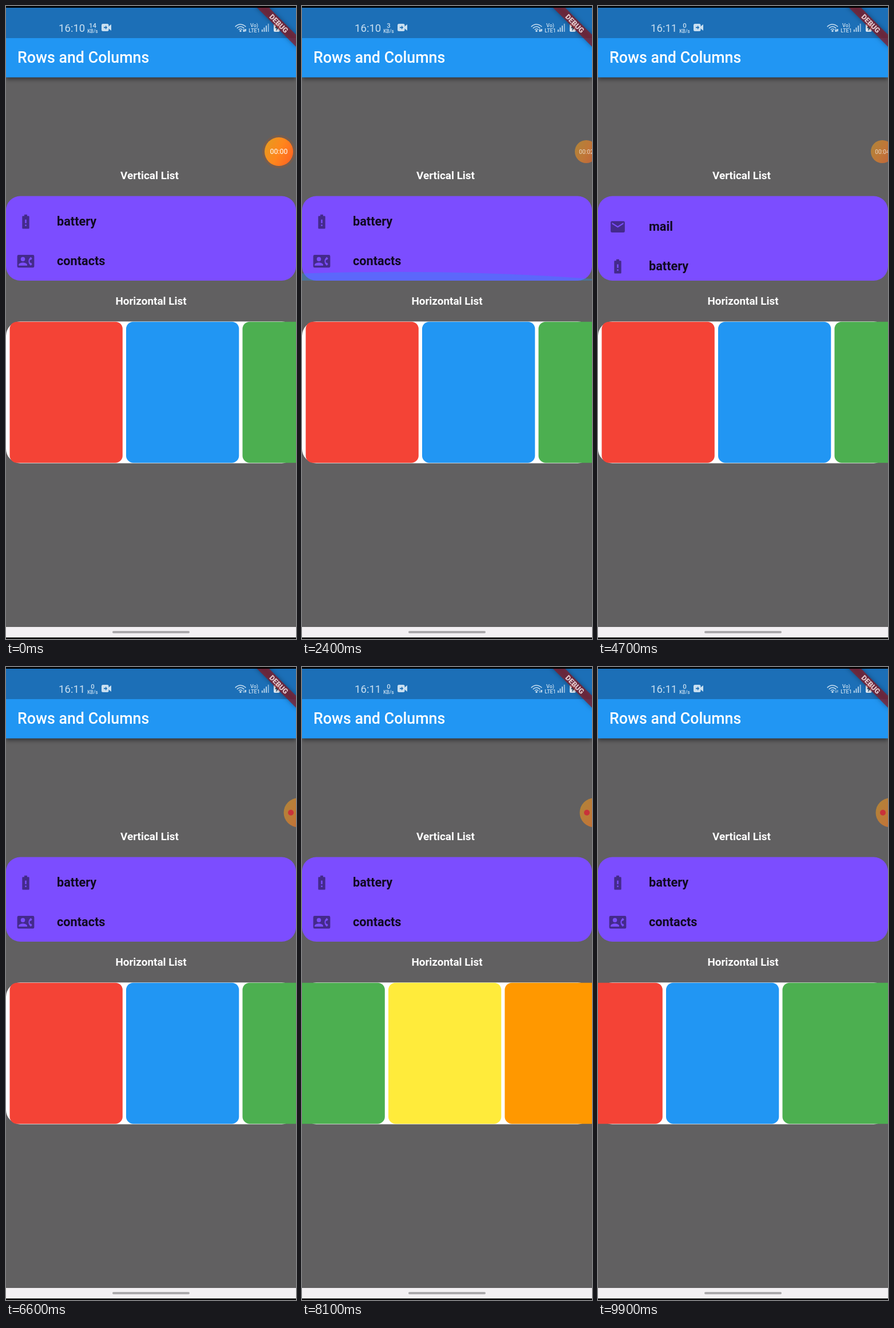
Animation of 507x1104 px, one loop 10 s. Source, as an HTML page with a canvas:

```html
<!DOCTYPE html>
<html lang="en">
<head>
<meta charset="utf-8">
<title>Rows and Columns</title>
<style>
  html, body { margin: 0; width: 100%; height: 100%; overflow: hidden; background: #000; }
  canvas { display: block; }
</style>
</head>
<body>
<canvas id="stage" width="507" height="1104"></canvas>
<script>
const ctx = document.getElementById('stage').getContext('2d');
const W = 507, H = 1104, LOOP = 10000, STEP = 100;
const LIST = { top: 331.5, bottom: 479, pitch: 69 };
const CARDS = { top: 550.7, height: 246, width: 197.3, pitch: 203.5, left: 6.5 };
const CARD_COLORS = ['#f44336', '#2196f3', '#4caf50', '#ffeb3b', '#ff9800'];

// Keyframes: [ms, value]
const listScroll = track([[600, 0], [1100, 60], [1500, 78], [1700, 76], [2050, 0],
  [2900, 0], [3400, 50], [3900, 76], [4700, 78], [5200, 76], [5900, 0]]);
const cardScroll = track([[6650, 0], [6950, 230], [7300, 348], [7400, 348], [8100, 466],
  [8600, 517], [8850, 517], [9100, 457], [9600, 152], [9900, 91]]);
const bottomGlow = track([[2000, 0], [2200, 0.24], [2400, 0.15], [2700, 0],
  [5900, 0], [6150, 0.29], [6500, 0]]);
const rightGlow = track([[8500, 0], [8800, 0.6], [9100, 0.32], [9300, 0]]);
const bubbleX = track([[700, 477], [1100, 497], [5400, 497], [5700, 511]]);
const bubbleR = track([[700, 25], [1100, 20], [5400, 20], [5700, 25.5]]);
const bubbleFade = track([[700, 0], [1100, 1]]);

// Monotone cubic interpolation, held flat outside the keys.
function track(keys) {
  const slope = i => (keys[i + 1][1] - keys[i][1]) / (keys[i + 1][0] - keys[i][0]);
  const tangent = i => {
    if (i === 0 || i === keys.length - 1) return 0;
    const a = slope(i - 1), b = slope(i);
    return a * b <= 0 ? 0 : 2 * a * b / (a + b);
  };
  return t => {
    if (t <= keys[0][0]) return keys[0][1];
    const i = keys.findIndex((k, n) => n < keys.length - 1 && t < keys[n + 1][0]);
    if (i < 0) return keys[keys.length - 1][1];
    const span = keys[i + 1][0] - keys[i][0], s = (t - keys[i][0]) / span;
    const ease = s * s * (3 - 2 * s);
    return keys[i][1] * (1 - ease) + keys[i + 1][1] * ease +
      span * s * (1 - s) * (tangent(i) * (1 - s) - tangent(i + 1) * s);
  };
}

function rect(x, y, w, h, color) {
  ctx.fillStyle = color;
  ctx.fillRect(x, y, w, h);
}

function round(x, y, w, h, r, color) {
  ctx.fillStyle = color;
  ctx.beginPath();
  ctx.roundRect(x, y, w, h, r);
  ctx.fill();
}

function disc(x, y, r, color) {
  ctx.fillStyle = color;
  ctx.beginPath();
  ctx.arc(x, y, r, 0, Math.PI * 2);
  ctx.fill();
}

function shape(path, color, rule = 'nonzero') {
  ctx.fillStyle = color;
  ctx.fill(new Path2D(path), rule);
}

function text(label, x, y, size, weight, color, align = 'left') {
  ctx.font = `${weight} ${size}px Roboto, sans-serif`;
  ctx.textAlign = align;
  ctx.fillStyle = color;
  ctx.fillText(label, x, y);
}

function clipped(x, y, w, h, draw) {
  ctx.save();
  ctx.beginPath();
  ctx.rect(x, y, w, h);
  ctx.clip();
  draw();
  ctx.restore();
}

function statusBar(t) {
  const ink = '#c9dff0';
  rect(0, 3, W, 53, '#1c6fb7');
  text(t < 4000 ? '16:10' : '16:11', 92, 44.5, 18.6, 400, ink);
  const speed = t < 400 ? '14' : t < 1800 ? '8' : t < 2900 ? '3' : '0';
  text(speed, 151.5, 38, 11.5, 500, ink, 'center');
  text('KB/s', 151.5, 47, 8.5, 500, ink, 'center');

  round(167, 31, 12.5, 13, 2.5, ink);
  shape('M179 36 L184 32 V43 L179 39 Z', ink);
  shape('M171 36.5 H174 V34 L177 37.5 L174 41 V38.5 H171 Z', '#1c6fb7');

  ctx.strokeStyle = ink;
  ctx.lineWidth = 1.5;
  for (const r of [4, 8, 12]) {
    ctx.beginPath();
    ctx.arc(410, 44, r, -Math.PI * 0.78, -Math.PI * 0.22);
    ctx.stroke();
  }
  disc(410, 43.5, 1.7, ink);
  shape('M414.5 42 L416 39.5 L417.5 42 V45 H414.5 Z', t < 5100 ? ink : '#6ca3d0');
  shape('M418 40 H420 V43 L419 45 L417.5 43 Z', t < 8600 ? ink : '#6ca3d0');
  text('Vo)', 434, 37, 9, 500, ink, 'center');
  text('LTE1', 434, 45.5, 9, 500, ink, 'center');
  for (let i = 0; i < 4; i++) {
    const h = 4 + i * 3.4;
    rect(447 + i * 3.6, 45 - h, 1.7, h, i < 3 ? ink : '#9cc2e1');
  }
  round(468, 31, 10.5, 14, 2, '#e3edf6');
  rect(471, 29.3, 4.5, 2, '#e3edf6');
  shape('M474.5 32 L470 38.5 H473 L472 44 L476.8 37 H473.8 Z', '#24435e');
}

function appBar() {
  ctx.save();
  ctx.shadowColor = 'rgba(0,0,0,.45)';
  ctx.shadowBlur = 7;
  ctx.shadowOffsetY = 3;
  rect(0, 56, W, 68.5, '#2196f3');
  ctx.restore();
  text('Rows and Columns', 20, 98.5, 26.8, 500, '#fff');
}

function debugBanner() {
  clipped(0, 3, W, 130, () => {
    ctx.translate(477, 30.5);
    ctx.rotate(Math.PI / 4);
    ctx.shadowColor = 'rgba(0,0,0,.5)';
    ctx.shadowBlur = 8;
    rect(-52, -7.5, 104, 15, 'rgba(145,22,28,.68)');
    ctx.shadowBlur = 0;
    text('DEBUG', 0, 4.5, 12.6, 900, '#e3c9cd', 'center');
  });
}

// Icons are drawn on a 24-unit square centred on the origin.
const icons = {
  mail: c => shape('M-8 -8 H8 Q10 -8 10 -6 V6 Q10 8 8 8 H-8 Q-10 8 -10 6 V-6 Q-10 -8 -8 -8 Z' +
    'M8 -4 V-6 L0 -1 L-8 -6 V-4 L0 1 Z', c, 'evenodd'),
  battery: c => shape('M-2 -10 H2 V-8 H4 Q5 -8 5 -7 V9 Q5 10 4 10 H-4 Q-5 10 -5 9 V-7 Q-5 -8 -4 -8 H-2 Z' +
    'M-1 -3 V2 H1 V-3 Z M-1 4 V6 H1 V4 Z', c, 'evenodd'),
  contacts: c => shape('M-10 -9 H10 Q12 -9 12 -7 V7 Q12 9 10 9 H-10 Q-12 9 -12 7 V-7 Q-12 -9 -10 -9 Z' +
    'M-7 -3 A3 3 0 0 0 -1 -3 A3 3 0 0 0 -7 -3 Z' +
    'M-10 6 H2 V5 C2 3 -2 1.9 -4 1.9 C-6 1.9 -10 3 -10 5 Z' +
    'M9 -4 L7 -6 Q4 -3.5 4 0 Q4 3.5 7 6 L9 4 L7.5 2 H5.9 Q5.2 0 5.9 -2 H7.5 Z', c, 'evenodd')
};

// Overscroll arc; the origin lies on the edge and +y points into the view.
function glow(width, scale, center, alpha) {
  if (scale < 0.005) return;
  const radius = width * 1.5, depth = width * 0.201;
  ctx.scale(1, scale);
  disc(center, depth - radius, radius, `rgba(33,150,243,${alpha})`);
}

function verticalList(t) {
  text('Vertical List', 251, 302, 18.9, 700, '#fff', 'center');
  round(0, LIST.top, W, LIST.bottom - LIST.top, 25, '#7c4dff');
  clipped(0, LIST.top, W, LIST.bottom - LIST.top, () => {
    const first = 306.5 + listScroll(t);
    ['mail', 'battery', 'contacts'].forEach((name, i) => {
      const y = first + i * LIST.pitch;
      ctx.save();
      ctx.translate(34.5, y + 0.7);
      ctx.scale(1.24, 1.24);
      icons[name]('rgba(0,0,0,.45)');
      ctx.restore();
      text(name, 89, y + 7.3, 21.7, 700, 'rgba(0,0,0,.87)');
    });
    const scale = bottomGlow(t);
    ctx.translate(0, LIST.bottom);
    ctx.scale(1, -1);
    glow(W, scale, 165, Math.min(0.35, scale * 2.3));
  });
}

function horizontalList(t) {
  text('Horizontal List', 253.5, 521, 18.9, 700, '#fff', 'center');
  round(0, 550.3, W, 247.1, 25, '#fff');
  const x0 = CARDS.left - cardScroll(t);
  CARD_COLORS.forEach((color, i) =>
    round(x0 + i * CARDS.pitch, CARDS.top, CARDS.width, CARDS.height, 12.5, color));
  clipped(0, CARDS.top, W, CARDS.height, () => {
    const scale = rightGlow(t);
    ctx.translate(W, CARDS.top);
    ctx.rotate(Math.PI / 2);
    glow(CARDS.height, scale, 148, scale * 0.4);
  });
}

function recorderBubble(t) {
  const x = bubbleX(t), r = bubbleR(t), fade = bubbleFade(t), y = 254;
  if (fade < 1) disc(x, y, r + 4, `rgba(150,88,50,${0.4 * (1 - fade)})`);
  const paint = ctx.createLinearGradient(x - r, y - r / 2, x + r, y + r / 2);
  paint.addColorStop(0, '#e79a1f');
  paint.addColorStop(0.5, '#ff861c');
  paint.addColorStop(1, '#ff6422');
  ctx.globalAlpha = 1 - 0.4 * fade;
  disc(x, y, r, paint);
  ctx.globalAlpha = 1;
  if (t >= 5500) {
    disc(498, y, 5, '#c8323a');
  } else {
    const clock = '00:0' + Math.floor(t / 1000);
    text(clock, x, y + 4.3 - fade * 0.6, 12.4 - fade * 2.2, 400,
      `rgba(255,255,255,${1 - 0.3 * fade})`, 'center');
  }
}

function navigationBar() {
  rect(0, 1083, W, 18.5, '#f3f0f3');
  round(186, 1090, 135, 4, 2, '#aaa8ab');
  rect(0, 1101.5, W, 2.5, '#000');
}

function draw(t) {
  rect(0, 0, W, H, '#000');
  rect(0, 3, W, H - 5, '#616061');
  appBar();
  statusBar(t);
  verticalList(t);
  horizontalList(t);
  debugBanner();
  recorderBubble(t);
  navigationBar();
}

const start = performance.now();
function tick() {
  const elapsed = (performance.now() - start) % LOOP;
  draw(Math.floor(elapsed / STEP) * STEP);
  requestAnimationFrame(tick);
}
tick();
</script>
</body>
</html>
```
